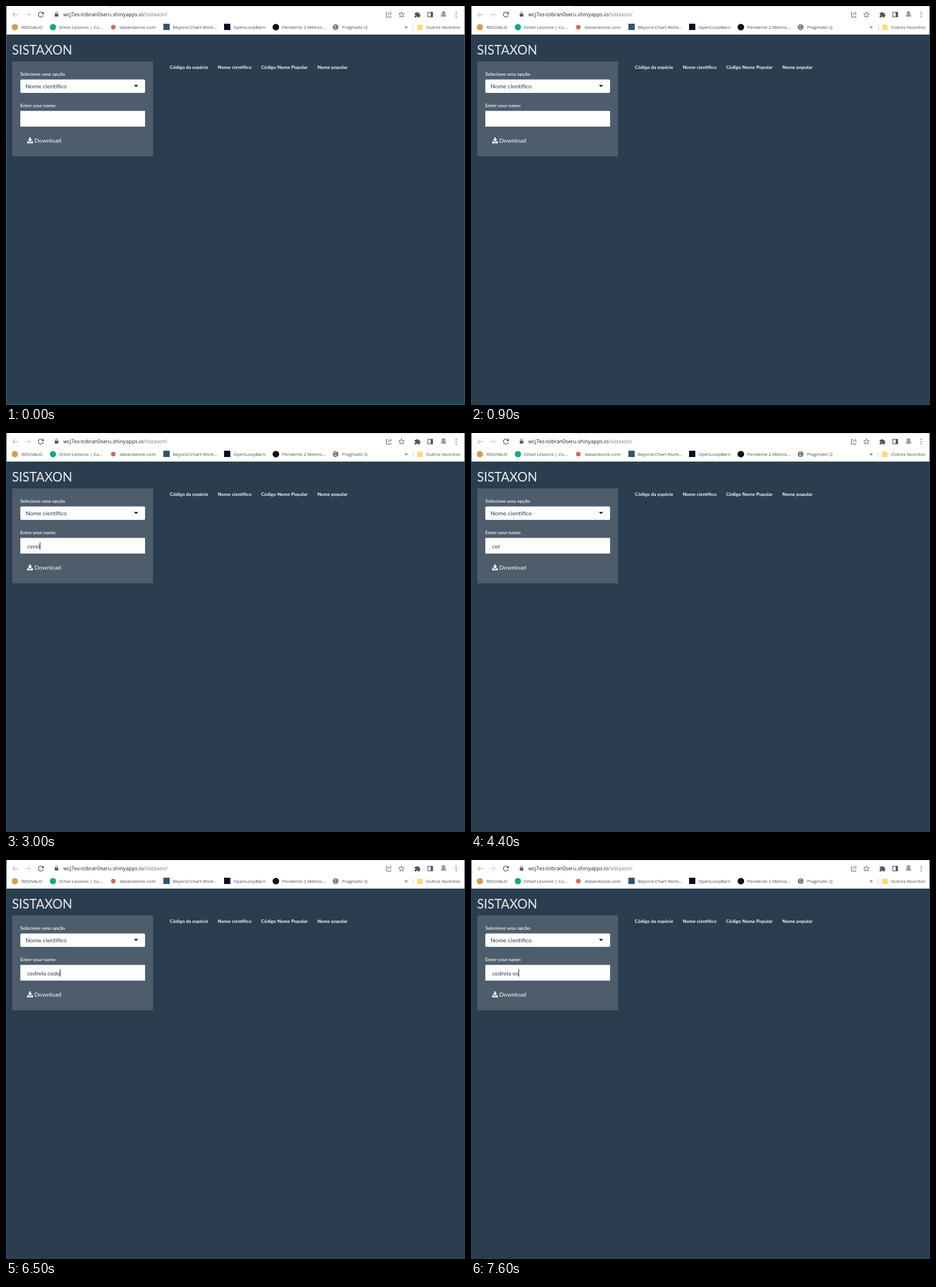
An HTML page for the animation above (8000 ms loop, 802 by 698 pixels).

```html
<!DOCTYPE html>
<html lang="pt">
<head>
<meta charset="utf-8">
<title>SISTAXON</title>
<style>
  html, body { margin: 0; width: 100%; height: 100%; overflow: hidden; }
  svg { display: block; width: 802px; height: 698px; }
  .page { font: 10.4px Lato, sans-serif; fill: #fff; }
  .page .dark { fill: #2b3e50; }
  .label { font-size: 8.35px; font-weight: 700; }
  .browser { font: 7.9px "Open Sans", sans-serif; fill: #45494e; }
  .icon { fill: none; stroke: #5f6368; stroke-width: 1.3; }
  .solid { fill: #54585d; stroke: none; }
</style>
</head>
<body>
<svg viewBox="0 0 802 698">
  <rect width="802" height="698" fill="#2b3e50"/>

  <g class="browser">
    <rect width="802" height="50" fill="#fff"/>
    <path d="M176 0H802V1H176z" fill="#dee1e6"/>
    <g class="icon">
      <path d="M21 15H12M16 10.7L11.7 15L16 19.3" stroke="#9a9da1" stroke-width="1"/>
      <path d="M33 15H42M38 10.7L42.3 15L38 19.3" stroke="#b9bbbe" stroke-width="1"/>
      <path d="M64.3 12.1A4.4 4.4 0 1 0 65.2 16.2"/>
      <path class="solid" d="M66 9.8V14.2H61.6z"/>
      <path d="M86.4 14V12.4a1.9 1.9 0 0 1 3.8 0V14" stroke-width="1"/>
      <rect class="solid" x="85.2" y="13.4" width="6.2" height="5.2" rx=".7"/>
      <path d="M667 11.5H664.5V19.5H672.5V17M667 16.5Q667.5 12.7 671.5 12.7M670.5 10L673.5 12.7L670.5 15.4" stroke-width="1"/>
      <path d="M691 10.3l1.4 3.2 3.5.3-2.7 2.3.8 3.4-3-1.8-3 1.8.8-3.4-2.7-2.3 3.5-.3z" stroke-width="1"/>
      <path class="solid" d="M714 12h2.8a1.6 1.6 0 0 1 3.2 0h2.6v2.6a1.6 1.6 0 0 1 0 3.2V20h-3a1.4 1.4 0 0 0-2.8 0H714v-2.8a1.4 1.4 0 0 0 0-2.8z"/>
      <rect x="737" y="11" width="8.5" height="8"/>
      <path class="solid" d="M742 11h3.5v8H742z"/>
      <circle cx="764.5" cy="14.5" r="6" fill="#eee" stroke="none"/>
      <path d="M764.5 9a3 3 0 0 1 1.8 5.4q2.8.8 2.8 4H760q0-3.2 2.7-4A3 3 0 0 1 764.5 9z" fill="#989898" stroke="none"/>
      <path d="M786.5 11v0M786.5 15v0M786.5 19v0" stroke-width="2" stroke-linecap="round"/>
    </g>
    <text x="100" y="18" font-size="9.16" fill="#202124">wcj7es-tobran0seru.shinyapps.io<tspan fill="#72767b">/sistaxon/</tspan></text>

    <circle cx="15.5" cy="37" r="5.5" fill="#d3a04b"/>
    <circle cx="82" cy="37" r="5.5" fill="#14a884"/>
    <circle cx="187.5" cy="37" r="4" fill="#d9675b"/>
    <rect x="275" y="31" width="11" height="11" fill="#34536d"/>
    <rect x="381" y="31" width="11" height="11" fill="#0a0a23"/>
    <circle cx="471.5" cy="37" r="5.8" fill="#111"/>
    <circle cx="576" cy="37" r="5" fill="#5f6368"/>
    <path d="M572.7 35.2h3l1.6-2M573 38.6h3l1.5 2M578 37h2.6" fill="none" stroke="#fff" stroke-width="1.2"/>
    <path d="M711.5 32V43" stroke="#cfd2d6"/>
    <path d="M719 32h4l1.2 1.2h3.8V42h-9z" fill="#fbdc6c"/>
    <text x="27" y="40">REGIVALO</text>
    <text x="92.5" y="40">Orbel Lessons | Cu...</text>
    <text x="198.5" y="40">dialandzone.com</text>
    <text x="291.5" y="40">Beyond Chart Work...</text>
    <text x="397.5" y="40">OpenLoopBarn</text>
    <text x="482.5" y="40">Pendente 2 Metros...</text>
    <text x="587" y="40">Pragmatic Q</text>
    <text x="696.5" y="40" font-size="11">»</text>
    <text x="734" y="40">Outros favoritos</text>
  </g>

  <g class="page">
    <text x="10.5" y="85" font-size="22.2" fill="#ebebeb">SISTAXON</text>
    <rect x="11" y="97" width="246" height="166" fill="#4e5d6c"/>
    <text class="label" x="25" y="122" fill="#ebebeb">Selecione uma opção</text>
    <rect x="25" y="128.5" width="218" height="23.5" rx="2.5" fill="#fdfdfd"/>
    <text class="dark" x="34" y="144.3">Nome científico</text>
    <path d="M223.5 138H231L227.2 142z" fill="#222"/>
    <text class="label" x="25" y="177" fill="#ebebeb">Enter your name:</text>
    <rect x="25" y="183.5" width="218" height="27.5" fill="#fdfdfd"/>
    <text class="dark" id="entry" x="37" y="202"></text>
    <rect id="caret" y="191" width="1" height="13" fill="#222"/>
    <path d="M40.6 230h2.8v3.5h2.5L42 237.4L38.1 233.5h2.5zM37 236.7h2.7L42 239l2.3-2.3H47v3.6H37z"/>
    <text x="49.5" y="238.5">Download</text>
    <g class="label" id="headers">
      <text x="286.3" y="109.5">Código da espécie</text>
      <text x="370" y="109.5">Nome científico</text>
      <text x="445.7" y="109.5">Código Nome Popular</text>
      <text x="544" y="109.5">Nome popular</text>
    </g>
  </g>
  <path id="border" d="M.5 0V697.5H801.5V0" fill="none"/>
</svg>
<script>
const LOOP = 8000;
const $ = id => document.getElementById(id);

// Each step: [start time in ms, value]; a trailing "|" shows the caret.
const typing = [
  [0, ''], [1300, '|'], [1600, 'c|'], [1700, 'ce|'], [2000, 'cer|'], [2200, 'cere|'],
  [2700, 'cere'], [3000, 'cerel|'], [3400, 'cere|'], [3500, 'cer'], [3700, 'ce'],
  [3900, 'ce|'], [4400, 'cer'], [4700, 'ce|'], [4900, 'ced|'], [5100, 'cedr|'],
  [5200, 'cedre|'], [5700, 'cedre'], [5900, 'cedrel|'], [6000, 'cedrela|'],
  [6300, 'cedrela o|'], [6400, 'cedrela os|'], [6500, 'cedrela osdo|'],
  [7000, 'cedrela osdo'], [7400, 'cedrela osd'], [7600, 'cedrela os|']
];
const headerOpacity = [[0, 1], [2700, .6], [2800, .3], [3000, 1], [7000, .4], [7200, 1]];
const borderColor = [[0, '#2c6587'], [800, '#255873'], [900, '#1d4a62']];

const at = (steps, time) => steps.findLast(([start]) => start <= time)[1];

function draw(now) {
  const time = now % LOOP;
  const value = at(typing, time);
  const entry = $('entry');
  entry.textContent = value.replace('|', '');
  $('caret').setAttribute('x', Math.round(36.7 + entry.getComputedTextLength()));
  $('caret').setAttribute('opacity', value.endsWith('|') ? 1 : 0);
  $('headers').setAttribute('opacity', at(headerOpacity, time));
  $('border').setAttribute('stroke', at(borderColor, time));
  requestAnimationFrame(() => draw(performance.now()));
}
draw(performance.now());
</script>
</body>
</html>
```
